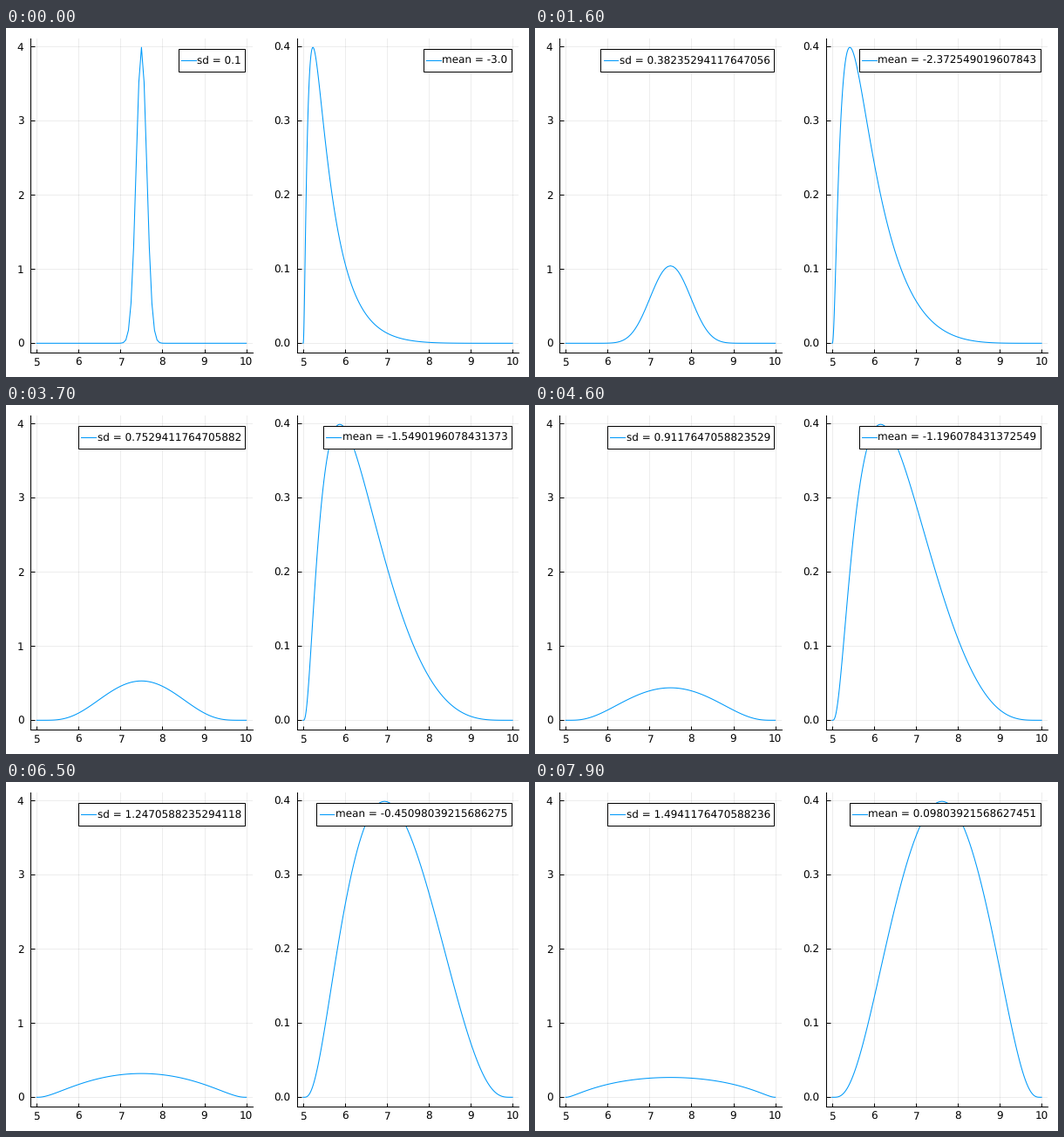
A matplotlib script for the animation above (8 s loop, 600 by 400 pixels).

```python
import matplotlib.pyplot as plt
import numpy as np
from matplotlib.animation import FuncAnimation
from matplotlib.patches import Rectangle

W, H, DPI = 600, 400, 100
PX = 72 / DPI  # points per pixel
FRAMES, INTERVAL = 80, 100
BLUE = "#009afa"
PEAK = 1 / np.sqrt(2 * np.pi)

plt.rcParams.update({
    "font.family": "DejaVu Sans",
    "font.size": 12 * PX,
    "text.hinting": "none",
    "path.simplify": False,
})

# Even steps on the logit scale, mapped onto the interval 5..10
logit = np.linspace(-10, 10, 401)
x = 5 + 5 / (1 + np.exp(-logit))


def normal_pdf(mean, sd):
    return PEAK / sd * np.exp(-0.5 * ((logit - mean) / sd) ** 2)


class Panel:
    TOP, BOTTOM, WIDTH = 12, 371.5, 254.8

    def __init__(self, fig, overlay, left, y_max, ticks, labels):
        height = self.BOTTOM - self.TOP
        ax = fig.add_axes([left / W, 1 - self.BOTTOM / H,
                           self.WIDTH / W, height / H])
        ax.set_xlim(4.85, 10.15)
        ax.set_ylim(-0.03 * y_max, 1.03 * y_max)
        ax.set_xticks(range(5, 11))
        ax.set_yticks(ticks, labels)
        ax.spines[["top", "right"]].set_visible(False)
        for side in ("left", "bottom"):
            ax.spines[side].set_linewidth(PX)
        ax.tick_params(direction="in", length=4.5 * PX, width=PX)
        ax.tick_params(axis="x", pad=6.5 * PX)
        ax.tick_params(axis="y", pad=7.5 * PX)
        ax.set_axisbelow(True)
        ax.grid(color="black", alpha=0.07, linewidth=PX)
        self.curve, = ax.plot([], [], color=BLUE, lw=1.05 * PX)

        # Legend box, anchored at its right edge
        self.right = left + 246.2
        self.box = Rectangle((0, 24), 0, 25.5, fc="white", ec="black", lw=PX)
        overlay.add_patch(self.box)
        self.key, = overlay.plot([], [], color=BLUE, lw=1.05 * PX)
        self.label = overlay.text(self.right - 4.2, 41, "", ha="right",
                                  va="baseline")

    def show(self, name, value, y):
        self.curve.set_data(x, y)
        self.label.set_text(f"{name} = {value}")
        width = self.label.get_window_extent().width + 26
        start = self.right - width
        self.box.set_x(start)
        self.box.set_width(width)
        self.key.set_data([start + 3.5, start + 20], [37, 37])


fig = plt.figure(figsize=(W / DPI, H / DPI), dpi=DPI, facecolor="white")
overlay = fig.add_axes([0, 0, 1, 1], zorder=5)
overlay.set_xlim(0, W)
overlay.set_ylim(H, 0)
overlay.axis("off")

tenths = [i / 10 for i in range(5)]
tenth_labels = [f"{t:.1f}" for t in tenths]
sd_panel = Panel(fig, overlay, 28, 10 * PEAK, range(5), range(5))
mean_panel = Panel(fig, overlay, 333.5, PEAK, tenths, tenth_labels)


def update(i):
    # One division each keeps the printed digits correctly rounded
    sd = (51 + 9 * i) / 510
    mean = (2 * i - 153) / 51
    sd_panel.show("sd", sd, normal_pdf(0, sd))
    mean_panel.show("mean", mean, normal_pdf(mean, 1))


anim = FuncAnimation(fig, update, frames=FRAMES, interval=INTERVAL,
                     init_func=lambda: None, repeat=True, repeat_delay=0)
plt.show()
```
